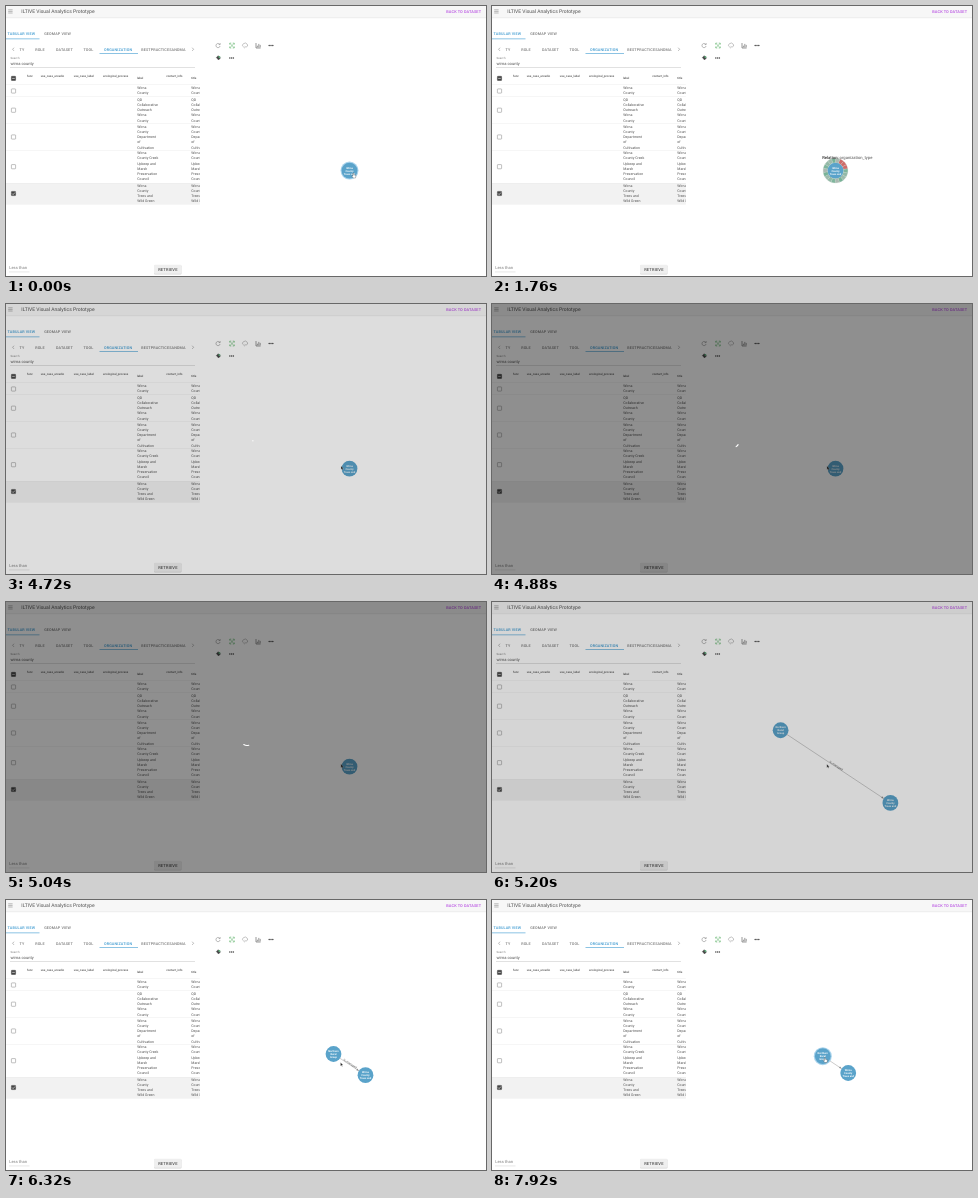
Write an HTML page that moves like this. It is 480 by 270 pixels and loops after 8 s.

```html
<!DOCTYPE html>
<html lang="en">
<head>
<meta charset="utf-8">
<title>Visual analytics</title>
<style>
  html, body { margin: 0; width: 100%; height: 100%; overflow: hidden; background: #fff; }
  svg { display: block; width: 100vw; height: 100vh; }
  text { font-family: Roboto, Arial, sans-serif; text-rendering: geometricPrecision; }
</style>
</head>
<body>
<svg id="stage" viewBox="0 0 480 270"></svg>
<script>
const NS = 'http://www.w3.org/2000/svg';
const LOOP = 8000;
const BLUE = '#3f9bd1', INK = '#505050', GREY = '#7c7c7c', RULE = '#e6e6e6';
const CENTER = [343.5, 164.6];
const stage = document.getElementById('stage');

function add(parent, tag, attrs = {}, content) {
  const el = document.createElementNS(NS, tag);
  for (const key in attrs) el.setAttribute(key, attrs[key]);
  if (content !== undefined) el.textContent = content;
  parent.append(el);
  return el;
}
const group = (parent = stage, attrs) => add(parent, 'g', attrs);
const rect = (x, y, width, height, fill, more, parent = stage) =>
  add(parent, 'rect', { x, y, width, height, fill, ...more });
const path = (d, stroke, width = 0.6, more, parent = stage) =>
  add(parent, 'path', { d, stroke, 'stroke-width': width, fill: 'none', ...more });
const label = (x, y, size, content, fill = INK, more, parent = stage) =>
  add(parent, 'text', { x, y, 'font-size': size, fill, ...more }, content);
const show = (el, on) => el.setAttribute('visibility', on ? 'visible' : 'hidden');
const move = (el, x, y, extra = '') => el.setAttribute('transform', `translate(${x} ${y}) ${extra}`);

// Linear interpolation through [time, value] steps.
function track(steps, t) {
  if (t <= steps[0][0]) return steps[0][1];
  for (let i = 1; i < steps.length; i++) {
    const [t0, a] = steps[i - 1], [t1, b] = steps[i];
    if (t <= t1) return a + (b - a) * (t - t0) / (t1 - t0);
  }
  return steps[steps.length - 1][1];
}

function drawHeader() {
  rect(0, 0, 480, 12.2, '#ececec');
  rect(0, 0, 480, 11.2, '#f7f7f7');
  path('M2.2 3.8h4.4M2.2 5.4h4.4M2.2 7h4.4', '#777', 0.5);
  label(15.3, 7.2, 5.03, 'ILTIVE Visual Analytics Prototype', INK);
  label(440.3, 6.9, 3.9, 'BACK TO DATASET', '#b850e2', { 'font-weight': 500, 'letter-spacing': 0.1 });
}

function drawTabs() {
  const tab = (x, y, name, active) =>
    label(x, y, 3.75, name, active ? BLUE : GREY, { 'font-weight': 500, 'letter-spacing': 0.12 });
  tab(1.6, 29.3, 'TABULAR VIEW', true);
  tab(38.2, 29.3, 'GEOMAP VIEW');
  rect(0, 32.6, 33.5, 0.6, BLUE);
  path('M8 41.7L6.6 43.3L8 44.9M186.2 41.7L187.6 43.3L186.2 44.9', '#777', 0.5);
  [[13.6, 'TY'], [29.2, 'ROLE'], [50, 'DATASET'], [77.4, 'TOOL'], [98, 'ORGANIZATION'], [135.2, 'BESTPRACTICESANDMA']]
    .forEach(([x, name]) => tab(x, 44.6, name, x === 98));
  rect(93.5, 47.3, 38.5, 0.6, BLUE);
  label(4.6, 52.5, 2.9, 'Search', GREY);
  label(4.5, 58.6, 4.1, 'wirna county');
  rect(4, 61, 185, 0.35, '#aaa');
}

function drawCheckbox(y, mark) {
  rect(5.4, y - 2.1, 4.2, 4.2, mark ? '#444' : 'none', { rx: 0.5, stroke: mark ? '#444' : '#808080', 'stroke-width': 0.5 });
  if (mark) path(mark === 'some' ? `M6.2 ${y}h2.6` : `M6.1 ${y}l1 1.1 1.9 -2.1`, '#fff', 0.6);
}

function drawTable() {
  const clip = add(add(stage, 'defs'), 'clipPath', { id: 'table' });
  rect(0, 62, 193.8, 140, '#000', {}, clip);
  const table = group(stage, { 'clip-path': 'url(#table)' });
  rect(0, 177, 194, 21, '#f2f2f2', {}, table);
  [[21, 71.3, 'func'], [34.7, 71.3, 'use_case_arcadio'], [67.8, 71.3, 'use_case_label'],
   [97, 71.3, 'ecological_process'], [131, 73.2, 'label'], [160.2, 71.3, 'contact_info'], [185.2, 73.2, 'title']]
    .forEach(([x, y, name]) => label(x, y, 2.95, name, INK, { 'font-weight': 500 }, table));
  const rows = [
    [83.2, 85, 'Wirna|County'],
    [94.6, 104.2, 'QD|Collaborative|Outreach|Wirna|County'],
    [121.6, 131, 'Wirna|County|Department|of|Cultivation'],
    [148.2, 160.7, 'Wirna|County Creek|Upkeep and|Marsh|Preservation|Council'],
    [180.8, 187.5, 'Wirna|County|Trees and|Wild Green']
  ];
  rows.forEach(([top, boxY, words], i) => {
    words.split('|').forEach((line, n) => {
      label(131.3, top + n * 5.23, 3.55, line, INK, {}, table);
      label(185.3, top + n * 5.23, 3.55, line, INK, {}, table);
    });
    drawCheckbox(boxY, i === 4 && 'all');
  });
  drawCheckbox(72.4, 'some');
  [78, 90.6, 117, 144, 177, 198].forEach(y => rect(0, y, 193.8, 0.35, RULE));
}

function drawFooter() {
  label(3.2, 263.2, 4.1, 'Less than', GREY);
  rect(3, 265.8, 20.5, 0.35, '#bbb');
  rect(148, 259.3, 27.5, 9.2, '#d6d6d6', { rx: 1 });
  rect(148, 258.8, 27.5, 9, '#efefef', { rx: 1 });
  label(152.2, 264.8, 4.05, 'RETRIEVE', INK, { 'font-weight': 500, 'letter-spacing': 0.15 });
}

function drawToolbar() {
  const dots = (x, y) => [-1.8, 0, 1.8].forEach(dx => add(stage, 'circle', { cx: x + dx, cy: y, r: 0.75, fill: '#444' }));
  path('M213.8 38.4A2.1 2.1 0 1 0 214.1 40M214.2 37.1v1.5h-1.6', '#777', 0.5);
  path('M223.7 38.7v-1.6h1.6M226.7 37.1h1.6v1.6M228.3 40.4v1.6h-1.6M225.3 42h-1.6v-1.6M223.7 37.1l4.6 4.9M228.3 37.1l-4.6 4.9', '#62b56d', 0.55);
  path('M237.4 40.8A2.5 2.1 0 1 1 240 41.2L238.6 40.3M238 41l.4 1.3', '#888', 0.5);
  path('M250 37v5h4.6M251.4 41.3v-1.6M252.8 41.3v-3.4M254.2 41.3v-2.4', '#555', 0.6);
  dots(265, 39.4);
  path('M210.3 51.5l2-1.8 2.2 2.2-2 2.1z', '#444', 0.4, { fill: '#444' });
  add(stage, 'circle', { cx: 213.4, cy: 50.9, r: 1, fill: '#62b07e' });
  dots(225.6, 52);
}

function makeNode(lines) {
  const el = group();
  const halo = add(el, 'circle', { r: 9, fill: '#a9d3ec' });
  add(el, 'circle', { r: 7.9, fill: '#5aa3ca' });
  lines.forEach((line, i) => label(0, -1.9 + i * 3, 2.6, line, '#fff',
    { 'text-anchor': 'middle', 'font-weight': 700 }, el));
  return { el, halo };
}

function makeRing() {
  const el = group();
  const greens = ['#9dbbac', '#78b297', '#a9b8b0', '#7fb59c', '#93b9a7'];
  const count = 18, step = 2 * Math.PI / count;
  const at = (angle, r) => `${r * Math.cos(angle)} ${r * Math.sin(angle)}`;
  for (let i = 0; i < count; i++) {
    const a = -1.2 + i * step, b = a + step;
    const fill = i < 3 ? '#cf6b69' : greens[i % 5];
    path(`M${at(a, 7.9)}L${at(a, 12.4)}A12.4 12.4 0 0 1 ${at(b, 12.4)}L${at(b, 7.9)}A7.9 7.9 0 0 0 ${at(a, 7.9)}Z`,
      '#c4d2cb', 0.25, { fill }, el);
  }
  return el;
}

drawHeader();
drawTabs();
drawTable();
drawFooter();
drawToolbar();

const edge = path('', '#999', 0.5);
const arrow = path('M0 0L-2.4 -1V1Z', 'none', 0, { fill: '#888' });
const edgeLabel = label(0, -0.3, 2.9, 'is_managed', '#555', { 'text-anchor': 'middle' });
const ring = makeRing();
const main = makeNode(['Wirna', 'County', 'Trees and']);
const other = makeNode(['Northern', 'Rural', 'Group']);
const relation = label(330.2, 152.6, 4.17, '', INK);
add(relation, 'tspan', { 'font-weight': 500, fill: '#333' }, 'Relation:');
add(relation, 'tspan', {}, ' organization_type');

const arrowCursor = path('M0 0V3.6L.9 2.8 1.5 4.1 2.1 3.8 1.5 2.6H2.6Z', '#fff', 0.25, { fill: '#222' });
const handCursor = path('M0 0V3L-.8 2.5 -1.2 3 .3 5H2.5L3 2.4 .8 1.8V0Z', '#333', 0.3, { fill: '#fff' });
const backdrop = rect(0, 0, 480, 270, '#000');
const spinner = path('', '#fff', 1.1, { 'stroke-linecap': 'round' });

const SPREAD = [[5120, 58], [5200, 55], [5280, 46], [5360, 39.5], [5440, 34], [5600, 27.5], [5800, 22.2],
  [6000, 18.9], [6320, 16], [6800, 13.8], [7200, 12.8], [8000, 12.7]];
const SHADE = [[4560, 0], [4640, 0.03], [4720, 0.13], [4800, 0.32], [4880, 0.44], [5040, 0.44],
  [5120, 0.3], [5200, 0.165], [5280, 0.08], [5360, 0.03], [5440, 0]];
const CURSOR_X = [[0, 347], [400, 347], [880, 351], [4080, 351], [4640, 335], [6320, 334.5], [7280, 332.5]];
const CURSOR_Y = [[0, 167], [400, 167], [880, 158], [4080, 158], [4640, 162], [6320, 162.5], [7280, 157.5]];
const RING = [[400, 0], [720, 1], [4080, 1], [4160, 0]];

function drawGraph(t) {
  const linked = t >= 5120;
  const dx = linked ? track(SPREAD, t) : 0, dy = dx * 0.662;
  const [cx, cy] = CENTER;
  move(main.el, cx + dx, cy + dy);
  move(other.el, cx - dx, cy - dy);
  show(other.el, linked);
  show(main.halo, t < 400);
  show(other.halo, t >= 7280);
  show(edge, linked);
  show(arrow, linked);
  show(edgeLabel, linked && t < 7280);
  edge.setAttribute('d', `M${cx - dx} ${cy - dy}L${cx + dx} ${cy + dy}`);
  const tip = 1 - 8 / Math.hypot(dx, dy);
  if (linked) move(arrow, cx + dx * tip, cy + dy * tip, 'rotate(33.5)');
  move(edgeLabel, cx, cy, 'rotate(33.5)');
}

function drawMenu(t) {
  const scale = track(RING, t);
  move(ring, ...CENTER, `scale(${0.65 + 0.35 * scale})`);
  show(ring, scale > 0);
  show(relation, t >= 880 && t < 4080);
}

function drawCursor(t) {
  const hand = t < 400 || t >= 7280;
  const x = track(CURSOR_X, t), y = track(CURSOR_Y, t);
  [arrowCursor, handCursor].forEach(el => move(el, x, y));
  show(handCursor, hand);
  show(arrowCursor, t >= 4160 && !hand);
}

function drawLoading(t) {
  backdrop.setAttribute('opacity', track(SHADE, t));
  show(spinner, t >= 4720 && t < 5120);
  const start = -10 + (t - 4720) / 1400 * 360;
  const sweep = track([[4720, 4], [5040, 50]], t);
  const point = deg => `${241 + 6 * Math.cos(deg * Math.PI / 180)} ${137.5 + 6 * Math.sin(deg * Math.PI / 180)}`;
  spinner.setAttribute('d', `M${point(start)}A6 6 0 0 1 ${point(start + sweep)}`);
}

const origin = performance.now();
function render(now) {
  const t = Math.max(0, now - origin) % LOOP;
  drawGraph(t);
  drawMenu(t);
  drawCursor(t);
  drawLoading(t);
  requestAnimationFrame(render);
}
render(origin);
</script>
</body>
</html>
```
